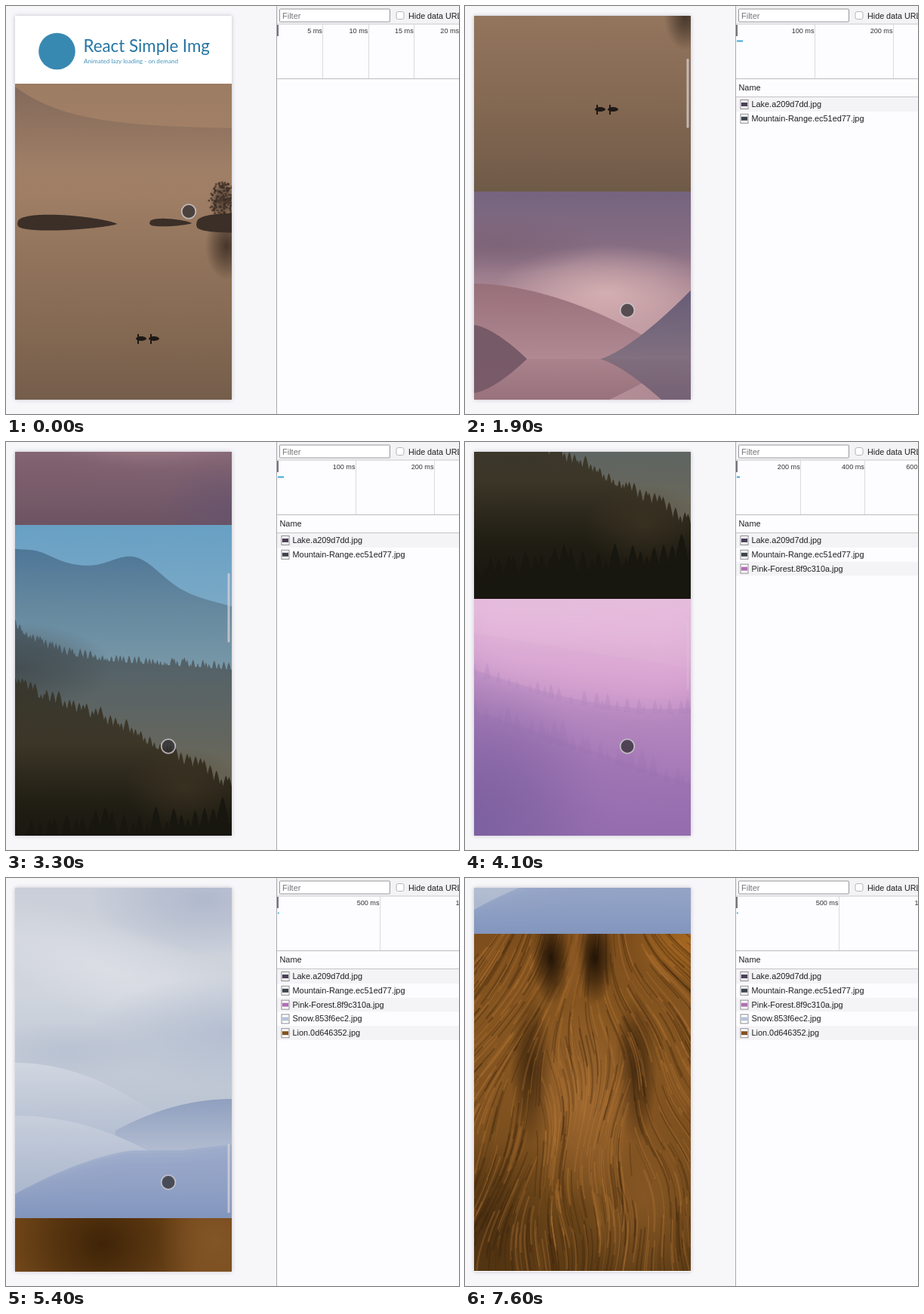
Recreate the animation shown at these times as an HTML page with a canvas. Size 600 by 541 pixels, loop 7.7 s.

```html
<!DOCTYPE html>
<html lang="en">
<head>
<meta charset="utf-8">
<title>Lazy image loading</title>
<style>
html, body { margin: 0; width: 100%; height: 100%; overflow: hidden; background: #f7f6f9; }
canvas, svg { position: absolute; left: 0; top: 0; width: 600px; height: 541px; }
svg { font-family: "Liberation Sans", Arial, sans-serif; }
svg svg { font-family: Lato, sans-serif; }
</style>
</head>
<body>
<canvas id="stage" width="600" height="541"></canvas>
<svg id="text" viewBox="0 0 600 541"></svg>
<script>
const LOOP = 7700, STEP = 100;
const W = 287, H = 447, LEFT = 12, TOP = 13, VIEW = 509, HEADER = 90;
const stage = document.getElementById('stage').getContext('2d');
const overlay = document.getElementById('text');
const clamp = v => Math.max(0, Math.min(1, v));
const ease = v => v * v * (3 - 2 * v);
const hump = (x, mid, width) => Math.exp(-(((x - mid) / width) ** 2));

let seed = 7;
function rand() {
  seed = (seed * 16807) % 2147483647;
  return seed / 2147483647;
}

// ---- painting helpers ----
function surface(paint) {
  const c = document.createElement('canvas');
  c.width = W;
  c.height = H;
  paint(c.getContext('2d'), c);
  return c;
}

function fade(c, y0, y1, ...colors) {
  const g = c.createLinearGradient(0, y0, 0, y1);
  colors.forEach((col, i) => g.addColorStop(i / (colors.length - 1), col));
  return g;
}

function fillAll(c, ...colors) {
  c.fillStyle = fade(c, 0, H, ...colors);
  c.fillRect(0, 0, W, H);
}

// Soft ellipse
function blob(c, x, y, rx, ry, rgb, alpha = 0.8) {
  c.save();
  c.translate(x, y);
  c.scale(rx, ry);
  const g = c.createRadialGradient(0, 0, 0, 0, 0, 1);
  g.addColorStop(0, `rgba(${rgb},${alpha})`);
  g.addColorStop(0.5, `rgba(${rgb},${alpha * 0.55})`);
  g.addColorStop(1, `rgba(${rgb},0)`);
  c.fillStyle = g;
  c.fillRect(-1, -1, 2, 2);
  c.restore();
}

// Area between the height function and a base line
function land(c, fill, height, base = H, x0 = 0, x1 = W) {
  c.fillStyle = fill;
  c.beginPath();
  c.moveTo(x0, base);
  for (let x = x0; x <= x1; x++) c.lineTo(x, height(x));
  c.lineTo(x1, base);
  c.fill();
}

function forest(c, fill, height, gap, size) {
  land(c, fill, height);
  c.beginPath();
  for (let x = 0; x < W; x += gap * (0.5 + rand())) {
    const y = height(x), h = size * (0.3 + rand()), w = 1.5 + h * 0.22;
    c.moveTo(x - w, y + 7);
    c.quadraticCurveTo(x - w * 0.5, y - h * 0.7, x, y - h);
    c.quadraticCurveTo(x + w * 0.5, y - h * 0.7, x + w, y + 7);
  }
  c.fill();
}

// Rock on the water with its reflection
function rock(c, x0, x1, level, size) {
  const bulk = x => {
    const u = (x - x0) / (x1 - x0);
    return 1.75 * size * u ** 0.35 * (1 - u) ** 0.75;
  };
  land(c, '#3b2f28', x => level - bulk(x), level, x0, x1);
  land(c, '#3b2f28', x => level + bulk(x) * 0.7, level, x0, x1);
}

// ---- photos ----
function duskLake(c) {
  fillAll(c, '#9c7c63', '#a58369', '#92745c', '#836852', '#6f5a48');
  land(c, fade(c, 0, 150, 'rgba(112,92,86,.6)', 'rgba(130,104,86,0)'),
    x => 60 - 56 * Math.exp(-x / 75), 160);
  blob(c, 280, 215, 28, 45, '50,38,30');
  rock(c, 3, 135, 186, 14);
  rock(c, 178, 234, 185, 7);
  rock(c, 240, 390, 187, 17);
  blob(c, 275, 155, 18, 28, '60,46,38');
  c.fillStyle = 'rgba(58,45,37,.75)';
  for (let i = 0; i < 170; i++) {
    const turn = rand() * 7, r = Math.sqrt(rand());
    c.fillRect(274 + 20 * r * Math.cos(turn), 152 + 23 * r * Math.sin(turn), 2.5, 2.5);
  }
  c.fillStyle = '#1d1815';
  for (const x of [167, 184]) {
    c.beginPath();
    c.ellipse(x, 338, 7, 3, 0, 0, 7);
    c.fill();
    c.fillRect(x - 5, 332, 2, 13);
  }
}

function pinkLake(c, self) {
  const level = 222;
  c.fillStyle = fade(c, 0, level, '#75647f', '#866d82', '#b28d98', '#c8a3a8');
  c.fillRect(0, 0, W, level);
  blob(c, 175, 135, 150, 65, '222,184,184');
  blob(c, 30, 70, 140, 40, '122,94,114', 0.6);
  land(c, fade(c, 120, level, '#976f78', '#b08992'), x => 122 + 70 * (x / 226) ** 1.8, level);
  land(c, fade(c, 135, level, '#685d78', '#81707f'),
    x => level - 91 * ((x - 166) / 121) ** 1.35, level, 166);
  land(c, '#765a68', x => 177 + 45 * (x / 70) ** 1.5, level, 0, 70);
  c.save();
  c.translate(0, level * 2);
  c.scale(1, -1);
  c.drawImage(self, 0, 0, W, level, 0, 0, W, level);
  c.restore();
  c.fillStyle = fade(c, level, H, 'rgba(125,88,102,.12)', 'rgba(132,96,106,.5)', 'rgba(108,82,95,.9)');
  c.fillRect(0, level, W, H - level);
  blob(c, 287, 430, 100, 70, '98,82,112', 0.6);
}

function pinkLakeVeil(c) {
  fillAll(c, '#8b80a0', '#ae94ab', '#a98497', '#886878');
  blob(c, 40, 0, 150, 95, '88,86,128');
  blob(c, 0, 130, 90, 130, '132,88,108');
  blob(c, 140, 135, 140, 75, '200,160,172');
  blob(c, 287, 90, 110, 130, '174,164,192');
  blob(c, 287, 225, 110, 60, '125,118,152');
}

function blueRange(c) {
  fillAll(c, '#68a0c4', '#8fb2c8', '#8faabb');
  land(c, fade(c, 35, 190, '#4f7797', '#66899f', '#7898a8'),
    x => 33 + 75 * x / W - 6 * hump(x, 30, 25) - 32 * hump(x, 160, 45));
  forest(c, fade(c, 130, 320, '#4b5e6b', '#5a6465', '#69675a'),
    x => 184 - 50 * Math.exp(-x / 50) + 8 * (x / W) ** 3, 5, 9);
  blob(c, 0, 190, 130, 60, '58,66,68', 0.6);
  forest(c, fade(c, 210, H, '#39382f', '#3c3627', '#211e14', '#14130c'),
    x => 218 + 136 * x / W - 12 * Math.sin(Math.PI * x / W), 6, 16);
  blob(c, 225, 350, 80, 55, '75,62,42', 0.45);
  forest(c, '#17160f', x => 425 - 30 * x / W, 11, 30);
}

function pinkForest(c) {
  fillAll(c, '#e8c0df', '#ddabd4', '#c390c4', '#a577b4', '#9a70ae');
  land(c, 'rgba(204,150,202,.3)', x => 46 + 0.16 * x);
  forest(c, fade(c, 90, H, 'rgba(165,125,185,.55)', 'rgba(146,102,172,.9)'),
    x => 94 + 52 * Math.sin(x / 160), 13, 12);
  forest(c, fade(c, 150, H, 'rgba(145,105,172,.3)', 'rgba(130,98,165,.6)'),
    x => 148 + 0.34 * x, 13, 22);
  blob(c, 0, 290, 170, 190, '116,92,155');
}

function snow(c) {
  fillAll(c, '#c9ced8', '#cfd4dd', '#bcc5d3', '#a9b5ca');
  blob(c, 250, 25, 150, 75, '170,180,202');
  c.save();
  c.rotate(0.31);
  blob(c, 150, 75, 240, 65, '222,224,230');
  c.restore();
  blob(c, 287, 200, 190, 75, '174,186,206');
  blob(c, 70, 225, 120, 40, '176,187,206', 0.6);
  land(c, fade(c, 240, 340, '#d1d6e0', '#b3bed1'), x => 241 + 68 * (x / 186) ** 2, 360, 0, 220);
  land(c, fade(c, 288, 360, '#8f9fbf', '#b2bdd1'),
    x => 289 + 42 * ((W - x) / 154) ** 2, 360, 133);
  land(c, fade(c, 310, 410, '#c8cfdc', '#acb8ce'), x => 311 + 46 * (x / 175) ** 2, 430, 0, 200);
  const front = x => 357 + 58 * clamp(1 - x / 160) ** 1.5 - 8 * clamp((x - 220) / 67);
  for (let i = 0; i < 10; i++) land(c, 'rgba(140,155,193,.25)', x => front(x) + i * i);
  land(c, fade(c, 350, H, 'rgba(160,175,205,.3)', '#8295bd'), front);
}

const inBeard = (x, y) => Math.hypot((x - 146) / 66, (y - 235) / 130) < 1;

function lock(c) {
  let x = W * rand(), y = H * rand() - 30;
  const beard = inBeard(x, y), light = rand() < (beard ? 0.65 : 0.5);
  c.strokeStyle = light ? 'rgba(182,120,54,.32)' : 'rgba(54,31,9,.3)';
  c.lineWidth = 0.6 + 2.2 * rand();
  c.beginPath();
  c.moveTo(x, y);
  const size = 4 + 6 * rand();
  for (let i = 0; i < 9; i++) {
    const lean = (x - 146) / 146;
    x += size * ((beard ? -0.3 * lean : lean * (1.1 - y / H)) + 0.22 * Math.sin(y / 35 + x / 40));
    y += size;
    c.lineTo(x, y);
  }
  c.stroke();
}

function mane(c) {
  fillAll(c, '#7d4e1c', '#855520', '#825320', '#70481a', '#5c3b15');
  blob(c, 287, 10, 80, 60, '176,110,34');
  blob(c, 225, 350, 90, 130, '148,96,42', 0.6);
  blob(c, 20, 380, 80, 110, '48,29,10', 0.5);
  for (const x of [76, 214]) blob(c, x, 180, 28, 100, '44,26,8');
  blob(c, 146, 225, 80, 135, '164,108,52');
  c.lineCap = c.lineJoin = 'round';
  for (let i = 0; i < 650; i++) lock(c);
  for (const x of [102, 160]) blob(c, x, 32, 26, 62, '28,16,4', 0.95);
  blob(c, 133, 40, 15, 75, '140,88,36', 0.9);
}

function maneVeil(c) {
  fillAll(c, '#744819', '#7c5124', '#6a441b');
  blob(c, 115, 35, 130, 120, '60,34,6', 0.95);
  blob(c, 265, 30, 75, 90, '134,88,42');
}

function blurred(sharp) {
  return surface(c => {
    c.filter = 'blur(20px)';
    c.drawImage(sharp, -45, -45, W + 90, H + 90);
    c.drawImage(sharp, 0, 0);
  });
}

const photos = [
  { paint: duskLake, reveal: -LOOP },
  { paint: pinkLake, reveal: 1300, cover: pinkLakeVeil },
  { paint: blueRange, reveal: 2250 },
  { paint: pinkForest, reveal: 3900 },
  { paint: snow, reveal: 4700 },
  { paint: mane, reveal: 5700, cover: maneVeil }
];
for (const p of photos) {
  p.sharp = surface(p.paint);
  p.veil = p.cover ? surface(p.cover) : blurred(p.sharp);
}

// ---- scrolling: start, end, target ----
const moves = [
  [300, 1000, 246], [1700, 2450, 577], [2650, 3250, 887],
  [3300, 3600, 1236], [4350, 5300, 1887], [5700, 6700, 2264]
];

function scrollState(t) {
  let pos = 0, shown = 0;
  for (const [from, to, target] of moves) {
    if (t < from) break;
    pos += (target - pos) * ease(clamp((t - from) / (to - from)));
    shown = clamp(1 - (t - to - 300) / 300);
  }
  return { pos, shown };
}

// ---- text ----
function node(name, attrs, parent) {
  const el = document.createElementNS('http://www.w3.org/2000/svg', name);
  for (const k in attrs) el.setAttribute(k, attrs[k]);
  return parent.appendChild(el);
}

function label(str, x, y, size = 10.9, fill = '#1f1f22', parent = overlay, anchor = 'start') {
  const el = node('text', { x, y, fill, 'font-size': size, 'text-anchor': anchor }, parent);
  el.textContent = str;
  return el;
}

const show = (el, on) => el.setAttribute('visibility', on ? 'visible' : 'hidden');

const port = node('svg', { x: LEFT, y: TOP, width: W, height: VIEW }, overlay);
const header = node('g', {}, port);
label('React Simple Img', 90.5, 48, 22.3, '#2675a3', header);
label('Animated lazy loading - on demand', 91, 62.5, 8.15, '#4594bd', header);

label('Filter', 366, 16.5, 11, '#77777b');
label('Hide data URLs', 533, 16.5, 10.75);
const nameHead = label('Name', 362.5, 112);

// The scale widens as more time is covered
const rulers = [
  { start: 0, gap: 60.4, unit: 5 },
  { start: 1900, gap: 104, unit: 100 },
  { start: 3700, gap: 85.2, unit: 200 },
  { start: 4700, gap: 136, unit: 500 }
];
for (const r of rulers) {
  r.group = node('g', {}, overlay);
  for (let i = 1; i < 5; i++) label(i * r.unit + ' ms', 358.5 + i * r.gap, 36, 9.1, '#333', r.group, 'end');
}

const ROW = 18.8;
const files = [
  { name: 'Lake.a209d7dd.jpg', start: 700, color: '#4b4058' },
  { name: 'Mountain-Range.ec51ed77.jpg', start: 1900, color: '#3f444c' },
  { name: 'Pink-Forest.8f9c310a.jpg', start: 3700, color: '#b06fb4' },
  { name: 'Snow.853f6ec2.jpg', start: 4700, color: '#b4c3da' },
  { name: 'Lion.0d646352.jpg', start: 5100, color: '#84511d' }
];
files.forEach((f, i) => {
  f.y = 121 + i * ROW;
  f.text = label(f.name, 379.5, f.y + 13);
});

// ---- drawing ----
function rect(x, y, w, h, color) {
  stage.fillStyle = color;
  stage.fillRect(x, y, w, h);
}

function box(x, y, w, h, r, border) {
  stage.lineWidth = 1;
  stage.fillStyle = '#fff';
  stage.strokeStyle = border;
  stage.beginPath();
  stage.roundRect(x, y, w, h, r);
  stage.fill();
  stage.stroke();
}

function drawPhone(t) {
  const { pos, shown } = scrollState(t);
  stage.save();
  stage.shadowColor = 'rgba(60,55,70,.28)';
  stage.shadowBlur = 5;
  rect(LEFT, TOP, W, VIEW, '#fff');
  stage.restore();
  stage.save();
  stage.beginPath();
  stage.rect(LEFT, TOP, W, VIEW);
  stage.clip();
  stage.fillStyle = '#3889b2';
  stage.beginPath();
  stage.arc(67.5, 60 - pos, 24.3, 0, 7);
  stage.fill();
  photos.forEach((p, i) => {
    const y = Math.round(TOP + HEADER + i * H - pos);
    if (y > TOP + VIEW || y + H < TOP) return;
    stage.drawImage(p.veil, LEFT, y);
    stage.globalAlpha = clamp((t - p.reveal) / 600);
    stage.drawImage(p.sharp, LEFT, y);
    stage.globalAlpha = 1;
  });
  stage.fillStyle = `rgba(215,210,215,${0.75 * shown})`;
  stage.beginPath();
  stage.roundRect(293.5, 15.5 + pos * 0.1785, 3, 92, 1.5);
  stage.fill();
  stage.restore();
  header.setAttribute('transform', `translate(0 ${-pos})`);
}

function drawPointer(t) {
  if (t >= 6900) return;
  const k = ease(clamp((t - 50) / 350));
  stage.beginPath();
  stage.arc(242 - 27 * k, 272.5 + 131 * k, 9.3, 0, 7);
  stage.fillStyle = 'rgba(48,47,51,.75)';
  stage.fill();
  stage.lineWidth = 1.8;
  stage.strokeStyle = 'rgba(205,200,205,.85)';
  stage.stroke();
}

// Request phases in the timeline overview
function drawRequests(t, ruler) {
  if (ruler !== rulers[0]) return rect(360, 45.5, 800 / ruler.unit, 2, '#3ba9d8');
  if (t < files[0].start) return;
  rect(360, 45.5, 36, 1.6, '#b5a5ac');
  rect(396, 45.5, 9, 1.6, '#d0a04c');
  rect(405, 45.5, 15, 1.6, '#5a9462');
  for (let x = 420; x < 441; x += 3) rect(x, 45, 2.4, 2.4, '#3ba9d8');
}

function drawPanel(t) {
  rect(358, 0, 242, 541, '#fdfcfe');
  rect(358, 0, 242, 24, '#f3f2f4');
  rect(358, 23.5, 242, 1, '#cbcacd');
  box(362.5, 4, 146, 17, 1, '#98979b');
  box(517, 7.5, 10, 10, 2.5, '#b5b4b8');
  const ruler = rulers.filter(r => t >= r.start).pop();
  for (const r of rulers) show(r.group, r === ruler);
  for (let i = 1; i < 5; i++) rect(Math.round(359 + i * ruler.gap), 24, 1, 72, '#dad9dc');
  rect(358, 96, 242, 1, '#bcbbbf');
  rect(359, 25, 2, 15, '#77757b');
  drawRequests(t, ruler);
  const open = t >= files[0].start;
  show(nameHead, open);
  if (open) rect(358, 120, 242, 1, '#c4c3c7');
  files.forEach((f, i) => {
    const on = t >= f.start;
    show(f.text, on);
    if (!on) return;
    if (i % 2 === 0) rect(359, f.y, 241, ROW, '#f4f3f5');
    rect(364.5, f.y + 3, 11, 13, '#8d8b91');
    rect(365.5, f.y + 4, 9, 11, '#fff');
    rect(366, f.y + 7, 8, 5, f.color);
  });
  rect(358, 0, 1, 541, '#a9a8ac');
}

function frame(now) {
  const t = Math.floor((now % LOOP) / STEP) * STEP;
  rect(0, 0, 600, 541, '#f7f6f9');
  drawPhone(t);
  drawPointer(t);
  drawPanel(t);
}

const begin = performance.now();
function tick() {
  frame(performance.now() - begin);
  requestAnimationFrame(tick);
}
tick();
</script>
</body>
</html>
```
